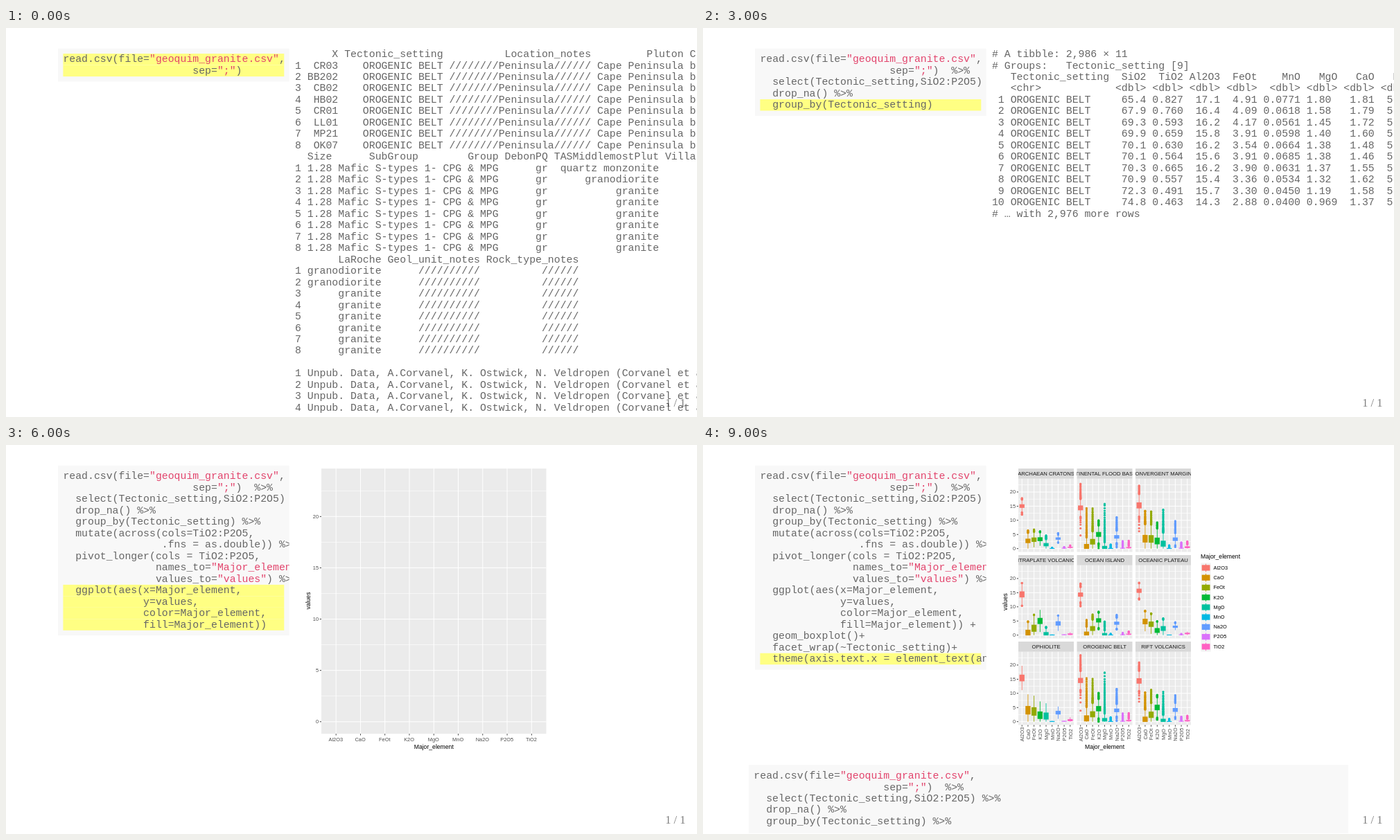
Recreate the animation shown at these times as an HTML page with a canvas. Size 997 by 562 pixels, loop 10 s.

```html
<!DOCTYPE html>
<html lang="en">
<head>
<meta charset="utf-8">
<title>Granite geochemistry, step by step</title>
<style>
html, body { margin: 0; width: 100%; height: 100%; overflow: hidden; background: #fff; }
#stage { position: absolute; left: 0; top: 0; width: 997px; height: 562px; overflow: hidden; }
#plot { position: absolute; left: 0; top: 0; }
#slide { position: absolute; width: 1210px; height: 681px; overflow: hidden;
  transform: scale(.82397); transform-origin: 0 0; }
pre { position: absolute; margin: 0; color: #666; white-space: pre;
  font: 18px/20px "Liberation Mono", "Courier New", monospace; }
.code { box-sizing: border-box; padding: 9px; overflow: hidden; background: #f8f8f8; }
.code div { height: 20px; }
.code .hot { background: #ffff83; }
.code span { color: #e2446c; }
#code { left: 91px; top: 36.3px; width: 405px; }
#again { left: 80px; top: 561px; width: 1050px; height: 120px; }
#out { left: 506px; top: 36.4px; }
#page { position: absolute; right: 20px; bottom: 12px; opacity: .5; color: #000;
  font: 20px/23px "Liberation Serif", "Times New Roman", serif; }
</style>
</head>
<body>
<div id="stage">
  <canvas id="plot" width="997" height="562"></canvas>
  <div id="slide">
    <pre id="code" class="code"></pre>
    <pre id="out"></pre>
    <pre id="again" class="code"></pre>
    <div id="page">1 / 1</div>
  </div>
</div>
<script>
const $ = id => document.getElementById(id);
const gap = n => ' '.repeat(n);
const range = n => [...Array(n).keys()];

// ---- pipeline code: lines of each step and the operator that joins the next one
const pipe = ' %>%';
const steps = [
  [['read.csv(file="geoquim_granite.csv",', gap(21) + 'sep=";")'], ' ' + pipe],
  [['  select(Tectonic_setting,SiO2:P2O5)'], pipe],
  [['  drop_na()'], pipe],
  [['  group_by(Tectonic_setting)'], pipe],
  [['  mutate(across(cols=TiO2:P2O5,', gap(16) + '.fns = as.double))'], pipe],
  [['  pivot_longer(cols = TiO2:P2O5,', gap(15) + 'names_to="Major_element",',
    gap(15) + 'values_to="values")'], pipe],
  [['  ggplot(aes(x=Major_element,', gap(13) + 'y=values,',
    gap(13) + 'color=Major_element,', gap(13) + 'fill=Major_element))'], ' +'],
  [['  geom_boxplot()'], '+'],
  [['  facet_wrap(~Tectonic_setting)'], '+'],
  [['  theme(axis.text.x = element_text(angle=90))'], '']
];

const markup = line => line.replace(/>/g, '&gt;').replace(/"[^"]*"/g, '<span>$&</span>');

function codeHtml(last, hot) {
  let html = '';
  steps.slice(0, last + 1).forEach(([lines, join], i) => lines.forEach((line, j) => {
    const tail = j === lines.length - 1 && i !== hot ? join : '';
    html += `<div${i === hot ? ' class="hot"' : ''}>${markup(line + tail)}</div>`;
  }));
  return html;
}

// ---- rock analyses: silica climbs within each suite, other oxides follow it
const suites = [[10, 65.4069, 74.77016], [6, 61.08795, 71.62353], [13, 69.69844, 76.69906], [2, 63.37698, 67.99483]];
const silica = suites.flatMap(([n, from, to]) => range(n).map(i =>
  from + (to - from) * (.5 + .5 * (2 * i / (n - 1) - 1) ** 3)));

// name, first value, slope against silica, scatter
const oxides = [
  ['TiO2', .8270369, -.045, .06], ['Al2O3', 17.0849, -.25, .4], ['FeOt', 4.91441, -.24, .25],
  ['MnO', .0771, -.0035, .008], ['MgO', 1.8, -.09, .08], ['CaO', 1.81, -.05, .12],
  ['K2O', 5.13, .02, .1], ['Na2O', 2.66, .02, .2], ['P2O5', .288, -.008, .03]
];
const rocks = silica.map((si, i) => ({
  si, values: oxides.map(([, first, slope, scatter], k) =>
    first + slope * (si - silica[0]) + scatter * Math.sin(i * (k + 2.3)))
}));

// ---- printed tables
const numbered = (rows, f) => rows.map((r, i) => f(r, i + 1)).join('\n');
const short = v => v.toPrecision(3);

function rawTable() {
  const ids = 'CR03 BB202 CB02 HB02 CR01 LL01 MP21 OK07'.split(' ');
  const plut = i => ['quartz monzonite', 'granodiorite'][i - 1] || 'granite';
  const roche = i => i < 3 ? 'granodiorite' : 'granite';
  return [
    gap(6) + 'X Tectonic_setting' + gap(10) + 'Location_notes' + gap(9) + 'Pluton C',
    numbered(ids, (id, i) => `${i} ${id.padStart(5)}    OROGENIC BELT ////////Peninsula////// Cape Peninsula b`),
    '  Size      SubGroup        Group DebonPQ TASMiddlemostPlut Villa',
    numbered(ids, (_, i) => `${i} 1.28 Mafic S-types 1- CPG & MPG      gr${plut(i).padStart(18)}`),
    gap(7) + 'LaRoche Geol_unit_notes Rock_type_notes',
    numbered(ids, (_, i) => `${i} ${roche(i).padStart(12)}${gap(6)}//////////${gap(10)}//////`),
    '',
    numbered(ids.slice(0, 4), (_, i) => `${i} Unpub. Data, A.Corvanel, K. Ostwick, N. Veldropen (Corvanel et al.`)
  ].join('\n');
}

const selected = () => gap(7) + 'Tectonic_setting     SiO2      TiO2    Al2O3       FeOt\n' +
  numbered(rocks, ({ si, values: [ti, al, fe] }, i) => `${i}`.padEnd(10) +
    `OROGENIC BELT ${si.toFixed(5)} ${ti.toFixed(7)} ${al.toFixed(5)} ${(fe.toFixed(6) + '0').padStart(10)} 0.`);

const tibble = (size, head, types, rows, more) => [
  `# A tibble: ${size}`, '# Groups:   Tectonic_setting [9]',
  '   Tectonic_setting  SiO2 ' + head, '   <chr>            <dbl> ' + types,
  numbered(rows, (r, i) => `${i}`.padStart(2) + ' OROGENIC BELT     ' + r),
  `# … with ${more} more rows`
].join('\n');

const grouped = () => tibble('2,986 × 11',
  ' TiO2 Al2O3  FeOt    MnO   MgO   CaO   K2O', '<dbl> <dbl> <dbl>  <dbl> <dbl> <dbl> <dbl>',
  rocks.slice(0, 10).map(({ si, values }) => {
    const [ti, al, fe, mn, mg, ca, k] = values.map(short);
    return [short(si), ti, ' ' + al, ' ' + fe, mn, mg.padEnd(5), ' ' + ca, ' ' + k].join(' ');
  }), '2,976');

const longer = () => tibble('26,874 × 4', 'Major_element  values', '<chr>           <dbl>',
  range(10).map(i => {
    const { si, values } = rocks[Math.floor(i / 9)], v = values[i % 9];
    return `${short(si)} ${oxides[i % 9][0].padEnd(14)}${v < 10 ? ' ' : ''}${short(v)}`;
  }), '26,864');

const outputs = [rawTable(), selected(), selected(), grouped(), grouped(), longer()];

// ---- box statistics
// name, colour, box ends, extremes, and how the box ends move in mafic rocks
const elements = [
  ['Al2O3', '#F8766D', 13.8, 15.95, 3.9, 23.5, .8, .8],
  ['CaO', '#D39200', .87, 3.55, 0, 15.4, 2.5, 2.7],
  ['FeOt', '#93AA00', 1.65, 4.3, 0, 15.15, .8, 1],
  ['K2O', '#00BA38', 2.6, 4.9, 0, 10.2, -2.2, -2],
  ['MgO', '#00C19F', .3, 2, 0, 17.3, .8, 1.6],
  ['MnO', '#00B9E3', 0, .12, 0, 1.55, 0, 0],
  ['Na2O', '#619CFF', 3.05, 4.35, .25, 11.6, -.6, -.9],
  ['P2O5', '#DB72FB', .08, .2, 0, 2.9, 0, 0],
  ['TiO2', '#FF61C3', .2, .65, 0, 3, .1, .2]
].map(([name, color, q1, q3, min, max, d1, d3]) => ({ name, color, q1, q3, min, max, d1, d3 }));

let seed = 7;
function rand() {
  seed = seed * 16807 % 2147483647;
  return seed / 2147483647;
}

// dots thin out from one value towards another
function trail(from, to, growth) {
  const dots = [], sign = Math.sign(to - from), span = Math.abs(to - from);
  for (let v = .1, d = .14; v < span; v += d * (.7 + .6 * rand()), d *= growth) dots.push(from + sign * v);
  return span > .1 ? [...dots, to] : dots;
}

function boxStats(e, mafic = 0, tail = 1, width = 1) {
  const a = e.q1 + mafic * e.d1, b = e.q3 + mafic * e.d3;
  const mid = (a + b) / 2, half = (b - a) / 2 * width;
  const q1 = Math.max(0, mid - half), q3 = mid + half, reach = 1.5 * (q3 - q1);
  const lo = Math.max(e.min, q1 - reach), hi = Math.min(e.max, q3 + reach);
  const dots = [...trail(hi, hi + tail * (e.max - hi), 1.06), ...trail(lo, lo - tail * (lo - e.min), 1.5)];
  return { lo, q1, q3, hi, dots };
}

const overall = elements.map(e => boxStats(e));

// setting, mafic character, outlier reach, box width
const facets = [
  ['ARCHAEAN CRATONS', .2, .1, .5],
  ['CONTINENTAL FLOOD BASALTS', -.6, .9, .7],
  ['CONVERGENT MARGINS', .5, .7, .9],
  ['INTRAPLATE VOLCANICS', -.6, .03, .9],
  ['OCEAN ISLAND', -.7, .2, .6],
  ['OCEANIC PLATEAU', 1, .05, .6],
  ['OPHIOLITE', .7, 0, 1],
  ['OROGENIC BELT', -.4, 1, .75],
  ['RIFT VOLCANICS', -.6, .55, .8]
].map(([name, ...traits]) => ({ name, stats: elements.map(e => boxStats(e, ...traits)) }));

// ---- plots
const ctx = $('plot').getContext('2d');
const top0 = 34, left0 = 455;

function rect(x, y, w, h, fill) {
  ctx.fillStyle = fill;
  ctx.fillRect(x, y, w, h);
}

const vline = (x, y1, y2, fill, w = .9) => rect(x - w / 2, y1, w, y2 - y1, fill);
const hline = (y, x1, x2, fill, w = .9) => rect(x1, y - w / 2, x2 - x1, w, fill);

function label(text, x, y, { size = 7.4, align = 'center', fill = '#4d4d4d', turn = false } = {}) {
  ctx.save();
  ctx.translate(x, y);
  if (turn) ctx.rotate(-Math.PI / 2);
  ctx.font = `${size}px "Liberation Sans", Arial, sans-serif`;
  ctx.textAlign = align;
  ctx.textBaseline = 'middle';
  ctx.fillStyle = fill;
  ctx.fillText(text, 0, 0);
  ctx.restore();
}

const title = (text, x, y, opts) => label(text, x, y, { size: 8.65, fill: '#000', ...opts });

function scales(x, y, w, h) {
  const unit = h / (23.5 * 1.1), pitch = w / 9.2;
  return { pitch, sx: i => x + (i + .6) * pitch, sy: v => y + h - (v + 1.175) * unit };
}

function boxplot(x, w, color, { lo, q1, q3, hi, dots }, sy) {
  vline(x, sy(hi), sy(lo), color);
  rect(x - w / 2 - .4, sy(q3) - .4, w + .8, sy(q1) - sy(q3) + .8, color);
  for (const v of dots) {
    ctx.beginPath();
    ctx.arc(x, sy(v), 1.6, 0, 7);
    ctx.fill();
  }
}

function panel(x, y, w, h, stats = []) {
  const { pitch, sx, sy } = scales(x, y, w, h);
  rect(x, y, w, h, '#ebebeb');
  for (let v = 2.5; v < 24; v += 5) hline(sy(v), x, x + w, '#fff', .6);
  for (let v = 0; v < 24; v += 5) hline(sy(v), x, x + w, '#fff', 1);
  elements.forEach((_, i) => vline(sx(i), y, y + h, '#fff', 1));
  stats.forEach((s, i) => boxplot(sx(i), pitch * .75, elements[i].color, s, sy));
}

function yAxis(x, y, w, h) {
  const { sy } = scales(x, y, w, h);
  for (let v = 0; v < 24; v += 5) {
    hline(sy(v), x - 2.3, x, '#333');
    label(v, x - 4, sy(v) + .4, { align: 'right' });
  }
}

function xAxis(x, y, w, h, turn) {
  const { sx } = scales(x, y, w, h);
  elements.forEach(({ name }, i) => {
    vline(sx(i), y + h, y + h + 2.3, '#333');
    label(name, sx(i) + (turn ? .8 : -.4), turn ? 418 : 425.6, { turn });
  });
}

function legend(mid) {
  title('Major_element', 718, mid - 65, { align: 'left' });
  elements.forEach(({ name, color }, i) => {
    const y = mid - 49.2 + i * 14.24, x = 725.6;
    rect(x - 7.1, y - 7.1, 14.2, 14.24, '#f2f2f2');
    vline(x, y - 5.8, y + 5.8, color);
    rect(x - 5.9, y - 4.1, 11.8, 8.2, color);
    label(name, 736.5, y + .3, { align: 'left', fill: '#000' });
  });
}

function titles(w, mid) {
  title('Major_element', left0 + w / 2, 437);
  title('values', 436.6, mid, { turn: true });
}

function singlePlot(w, stats) {
  const area = [left0, top0, w, 383.2];
  panel(...area, stats);
  yAxis(...area);
  xAxis(...area, false);
  titles(w, 225);
  if (stats) legend(225);
}

function facetPlot(h, turn) {
  const strip = 14.8, space = 4.5, w = 80;
  facets.forEach(({ name, stats }, i) => {
    const col = i % 3, row = Math.floor(i / 3);
    const x = left0 + col * (w + space), y = top0 + row * (h + strip + space);
    const area = [x, y + strip, w, h];
    rect(x, y, w, strip, '#d9d9d9');
    ctx.save();
    ctx.beginPath();
    ctx.rect(x, y, w, strip);
    ctx.clip();
    label(name, x + w / 2, y + strip / 2 + .6, { size: 7.7, fill: '#1a1a1a' });
    ctx.restore();
    panel(...area, stats);
    if (!col) yAxis(...area);
    if (row === 2) xAxis(...area, turn);
  });
  const bottom = top0 + 3 * (h + strip) + 2 * space, mid = (top0 + strip + bottom) / 2;
  titles(249, mid);
  legend(mid);
}

const plots = {
  6: () => singlePlot(324.5),
  7: () => singlePlot(249, overall),
  8: () => facetPlot(109.9, false),
  9: () => facetPlot(105.7, true)
};

// ---- playback: one step per second
function show(step) {
  $('code').innerHTML = codeHtml(step, step);
  $('out').textContent = outputs[step] || '';
  $('again').style.display = step === 9 ? 'block' : 'none';
  ctx.clearRect(0, 0, 997, 562);
  if (plots[step]) plots[step]();
}

$('again').innerHTML = codeHtml(3, -1);

let current = -1;
function tick() {
  const step = Math.floor(performance.now() / 1000) % steps.length;
  if (step !== current) show(current = step);
  requestAnimationFrame(tick);
}
tick();
</script>
</body>
</html>
```
